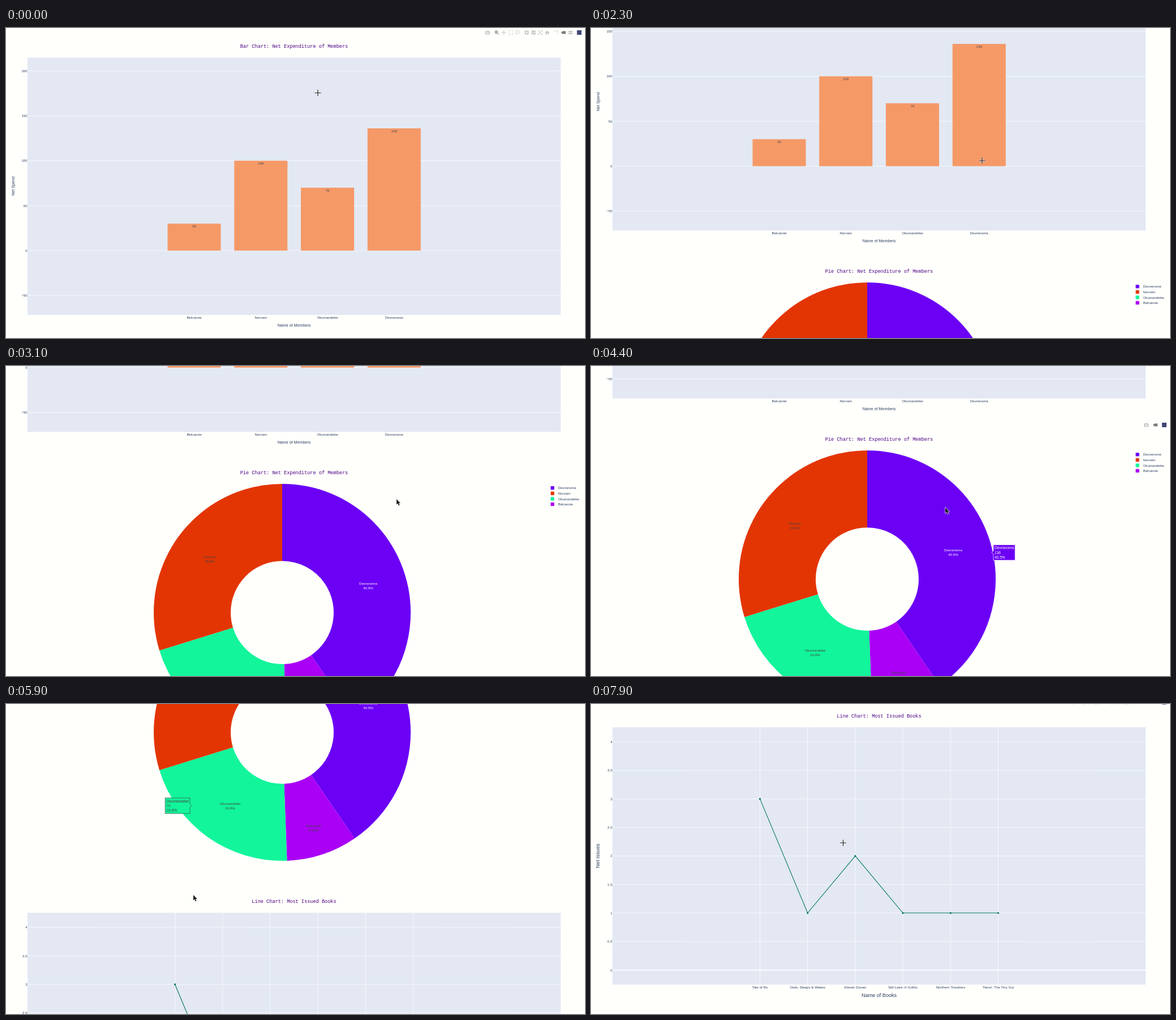
These frames come from a looping animation (1023x547 px, 8 s). An HTML page with a canvas:

```html
<!DOCTYPE html>
<html lang="en">
<head>
<meta charset="utf-8">
<title>Library charts</title>
<style>
  html, body { margin: 0; height: 100%; overflow: hidden; background: #fffffc; }
  canvas { display: block; width: 1023px; height: 547px; }
</style>
</head>
<body>
<canvas id="stage" width="1023" height="547"></canvas>
<script>
const ctx = document.getElementById('stage').getContext('2d');
const LOOP = 8000, STEP = 100;
const SANS = '"Liberation Sans", Arial, sans-serif';
const MONO = '"Liberation Mono", "Courier New", monospace';
const PAPER = '#fffffc', PLOT = '#e3e8f3', INK = '#2a3f5f', DARK = '#444', TITLE = '#4b0082';
const ORANGE = '#f59967', TEAL = '#00755e';
const LEFT = 38, RIGHT = 980, MID = 509;

const bars = [['Belcarote', 30], ['Norvam', 100], ['Okumandebe', 70], ['Devranoma', 136]]
  .map(([name, value], i) => ({ name, value, x: 332.5 + 117.75 * i, top: 392.8 - value * 1.586 }));

const pie = { x: 488, y: 825, r: 227, hole: 91 };
const TAU = 2 * Math.PI;
const slices = [
  { name: 'Devranoma', value: 136, share: '40.5%', color: '#6b00f5', text: '#fff', mid: 159 },
  { name: 'Belcarote', value: 30, share: '8.93%', color: '#aa00f5', text: DARK, mid: 178 },
  { name: 'Okumandebe', value: 70, share: '20.8%', color: '#12f59b', text: DARK, mid: 159 },
  { name: 'Norvam', value: 100, share: '29.8%', color: '#e33504', text: DARK, mid: 159 }
];
let turn = -TAU / 4;
for (const s of slices) {
  s.from = turn;
  s.to = turn += s.value / 336 * TAU;
  const a = (s.from + s.to) / 2;
  s.x = pie.x + s.mid * Math.cos(a);
  s.y = pie.y + s.mid * Math.sin(a);
}

const issueY = v => 1572 - v * 100.7;
const books = [['Tale of Ru', 3], ['Owls  Sleeps & Wakes', 1], ['Eleven Dunes', 2],
  ['Still Lake: A Gothic', 1], ['Northern Travelers', 1], ['Tiens!: The Tiny Gui', 1]]
  .map(([name, value], i) => ({ name, value, x: 298.5 + 84.2 * i, y: issueY(value) }));

// Timelines: [ms, value...]; each entry holds until the next.
const scrolls = [[0, 0], [2100, 30], [2200, 110], [2300, 149], [2500, 200], [2700, 295],
  [2800, 297], [2900, 310], [3000, 350], [3100, 390], [3200, 420], [3300, 438], [3400, 444], [3500, 446],
  [4400, 449], [4500, 540], [4600, 596], [5700, 620], [5800, 705], [5900, 775.2], [6000, 845],
  [6100, 880], [6200, 894], [6300, 920], [6400, 970], [6500, 1015], [6600, 1036.4], [6700, 1101], [6900, 1102.5]];
const pointer = [[0, 551, 114.5], [300, 545, 150], [400, 515, 230], [500, 475, 330], [600, 456.5, 384.5],
  [1000, 453.5, 384], [1100, 505, 370], [1200, 550, 335], [1300, 586.5, 302.5], [1600, 610, 290],
  [1700, 650, 262], [1800, 691, 234], [2700, 690, 235], [3300, 640, 190], [3400, 560, 140], [3500, 470, 112],
  [3600, 400, 180], [3700, 365, 240], [3900, 500, 240], [4000, 629, 242], [4200, 618, 234], [4400, 626, 250],
  [5000, 575, 265], [5100, 540, 300], [5200, 480, 325], [5400, 400, 280], [5500, 331, 337], [6000, 333, 337],
  [6400, 335, 320], [6500, 335, 312], [6900, 336, 223], [7100, 293, 178], [7200, 299, 168],
  [7700, 340, 190], [7800, 400, 225], [7900, 445.5, 245]];
const hovers = [[0], [500, 'bar', 1], [1100], [1200, 'bar', 2], [1700, 'bar', 3], [2100],
  [3700, 'pie', 3], [3900, 'pie', 0], [5100], [5200, 'pie', 2], [6000], [7200, 'line', 0], [7700]];
const at = (keys, t) => keys.findLast(k => k[0] <= t).slice(1);

function rect(x, y, w, h, color) {
  ctx.fillStyle = color;
  ctx.fillRect(x, y, w, h);
}

function text(str, x, y, { size = 6.2, color = INK, align = 'center', font = SANS } = {}) {
  ctx.font = `${size}px ${font}`;
  ctx.fillStyle = color;
  ctx.textAlign = align;
  ctx.fillText(str, x, y + size * 0.36);
}

function line(x1, y1, x2, y2, color = '#fff', width = 0.7) {
  ctx.strokeStyle = color;
  ctx.lineWidth = width;
  ctx.beginPath();
  ctx.moveTo(x1, y1);
  ctx.lineTo(x2, y2);
  ctx.stroke();
}

function verticalText(str, x, y, size) {
  ctx.save();
  ctx.translate(x, y);
  ctx.rotate(-TAU / 4);
  text(str, 0, 0, { size });
  ctx.restore();
}

const heading = (str, y) => text(str, MID, y, { size: 8.59, color: TITLE, font: MONO });

function gridRow(y, label, width) {
  line(LEFT, y, RIGHT, y, '#fff', width);
  text(label, 37.7, y, { align: 'right' });
}

function barChart() {
  heading('Bar Chart: Net Expenditure of Members', 32);
  rect(LEFT, 52.3, RIGHT - LEFT, 454, PLOT);
  for (let v = -50; v <= 200; v += 50) gridRow(392.8 - v * 1.586, String(v).replace('-', '−'));
  for (const b of bars) {
    rect(b.x - 47, b.top, 94, 392.8 - b.top, ORANGE);
    text(b.value, b.x, b.top + 5, { color: DARK });
    text(b.name, b.x, 510.8);
  }
  text('Name of Members', MID, 524.5, { size: 7.15 });
  verticalText('Net Spend', 12, 279, 7.15);
}

function pieChart() {
  heading('Pie Chart: Net Expenditure of Members', 577.7);
  for (const s of slices) {
    ctx.fillStyle = s.color;
    ctx.beginPath();
    ctx.arc(pie.x, pie.y, pie.r, s.from, s.to);
    ctx.arc(pie.x, pie.y, pie.hole, s.to, s.from, true);
    ctx.fill();
    text(s.name, s.x, s.y - 4, { color: s.text });
    text(s.share, s.x, s.y + 4, { color: s.text });
  }
  [0, 3, 2, 1].forEach((index, row) => {
    const y = 605.2 + 9.55 * row;
    rect(962.4, y - 3.1, 6.2, 6.2, slices[index].color);
    text(slices[index].name, 975.5, y, { align: 'left' });
  });
}

function lineChart() {
  heading('Line Chart: Most Issued Books', 1123.4);
  rect(LEFT, 1143.6, RIGHT - LEFT, 454, PLOT);
  for (const b of books) line(b.x, 1143.6, b.x, 1597.6);
  for (let v = 0; v <= 4; v += 0.5) gridRow(issueY(v), v, v ? 0.7 : 1.3);
  ctx.strokeStyle = TEAL;
  ctx.lineWidth = 1.1;
  ctx.beginPath();
  for (const b of books) ctx.lineTo(b.x, b.y);
  ctx.stroke();
  for (const b of books) {
    ctx.fillStyle = TEAL;
    ctx.beginPath();
    ctx.arc(b.x, b.y, 1.6, 0, TAU);
    ctx.fill();
    text(b.name, b.x, 1602);
  }
  text('Name of Books', MID, 1616, { size: 9.1 });
  verticalText('Net Issues', 12, 1370.5, 9.1);
}

// Toolbar icons: [x, filled path, stroked path, active]
const CAMERA = 'M-4-2.5h2l1-1h2l1 1h2v6h-8zM2 .4a2 2 0 1 0-4 0a2 2 0 1 0 4 0M1 .4a1 1 0 1 0-2 0a1 1 0 1 0 2 0';
const TAG = 'M-4 0l2.5-2.5h5.5v5h-5.5z';
const chartIcons = [
  [851, CAMERA, ''],
  [867, '', 'M2-.7a2.6 2.6 0 1 0-5.2 0a2.6 2.6 0 1 0 5.2 0M1.4 1.4l2.4 2.4M-2-.7h2.8M-.6-2.1v2.8', true],
  [879.7, 'M0-4l1.4 1.6h-2.8zM0 4l1.4-1.6h-2.8zM-4 0l1.6-1.4v2.8zM4 0l-1.6-1.4v2.8z', 'M-3 0h6M0-3v6'],
  [891.8, '', 'M-3.5-3.5h1.4m1.4 0h1.4m1.4 0h1.4v1.4m0 1.4v1.4m0 1.4v1.4h-1.4m-1.4 0h-1.4m-1.4 0h-1.4v-1.4m0-1.4v-1.4m0-1.4v-1.4'],
  [904, '', 'M-2.5 1.2C-5-1-3-3.3 0-3.3S4.500-1 2.800.5S-1 2-2.500 1.200C-3.500 2-2 2.500-2.800 3.800'],
  [920, 'M-3.5-3.5h7v7h-7zM-.6-2.3v1.7h-1.700v1.200h1.700v1.700h1.200v-1.700h1.700v-1.200h-1.700v-1.700z', ''],
  [932, 'M-3.5-3.500h7v7h-7zM-2.300-.6v1.200h4.600v-1.200z', ''],
  [944.2, 'M-4-4h2.500l-2.500 2.500zM4-4h-2.500l2.500 2.500zM-4 4h2.500l-2.500-2.500zM4 4h-2.500l2.500-2.500z', 'M-3-3l6 6M3-3l-6 6'],
  [956.3, 'M-4 .2l4-3.700l4 3.700h-1v3.300h-2.200v-2.200h-1.600v2.200h-2.200v-3.300z', ''],
  [972, 'M2-3.500h1.500v1.500h-1.500z', 'M-4-2.700h1.500m1 0h1.500m1 0h1M2.700-1v1.500m0 1v1.500'],
  [984.800, TAG, '', true],
  [997, 'M-4-1.500l1-1.500h7v2.600h-7zM-4 1.700l1-1.300h7v2.600h-7z', '']
];
const pieIcons = [[981, CAMERA, ''], [997, TAG, '', true]];

function toolbar(icons, y) {
  for (const [x, fill, stroke, active] of icons) {
    ctx.save();
    ctx.translate(x, y);
    ctx.fillStyle = ctx.strokeStyle = active ? '#7c7c7b' : '#c7c7c5';
    ctx.lineWidth = 1;
    ctx.fill(new Path2D(fill), 'evenodd');
    ctx.stroke(new Path2D(stroke));
    ctx.restore();
  }
  rect(1008.8, y - 4, 8, 8, '#3f4674');
}

// Callout whose tip is at (x, y); side is 1 for right, -1 for left.
function callout(x, y, side, lines, fill, ink) {
  ctx.font = `6.6px ${SANS}`;
  const w = Math.max(...lines.map(s => ctx.measureText(s).width)) + 4.2;
  const h = lines.length * 8.3 + 2.5;
  const near = x + 3 * side, far = near + w * side;
  ctx.beginPath();
  for (const [px, py] of [[x, 0], [near, -3], [near, -h / 2], [far, -h / 2], [far, h / 2], [near, h / 2], [near, 3]])
    ctx.lineTo(px, y + py);
  ctx.closePath();
  ctx.fillStyle = fill;
  ctx.strokeStyle = ink;
  ctx.lineWidth = 0.7;
  ctx.fill();
  ctx.stroke();
  lines.forEach((s, i) =>
    text(s, Math.min(near, far) + 2.1, y - h / 2 + 5.5 + 8.3 * i, { size: 6.6, color: ink, align: 'left' }));
}

function hoverLabel(kind, index) {
  if (kind === 'bar') {
    const b = bars[index];
    callout(b.x + 47, b.top, 1, [`(${b.name}, ${b.value})`, `${b.value}`], ORANGE, DARK);
  } else if (kind === 'pie') {
    const s = slices[index], side = s.x > pie.x ? 1 : -1;
    callout(s.x + side * (pie.r - s.mid), s.y, side, [s.name, `${s.value}`, s.share], s.color, s.text);
  } else if (kind === 'line') {
    const b = books[index];
    callout(b.x + 2, b.y, 1, [`(${b.name}, ${b.value})`], TEAL, '#fff');
  }
}

const ARROW = new Path2D('M0 0v9.500l2.200-2l1.700 3.700l1.700-.8l-1.700-3.500h3z');
const CROSS = new Path2D('M-5.500 0h11M0-5.500v11');

function drawPointer(x, y, crosshair) {
  ctx.save();
  ctx.translate(x, y);
  ctx.strokeStyle = 'rgba(255,255,255,.75)';
  ctx.lineWidth = crosshair ? 2.6 : 1.4;
  ctx.stroke(crosshair ? CROSS : ARROW);
  ctx.fillStyle = ctx.strokeStyle = '#1c1c1c';
  ctx.lineWidth = 1.2;
  if (crosshair) ctx.stroke(CROSS); else ctx.fill(ARROW);
  ctx.restore();
}

function draw(now) {
  const t = Math.floor(now % LOOP / STEP) * STEP;
  rect(0, 0, 1023, 547, PAPER);
  ctx.save();
  ctx.translate(0, -at(scrolls, t)[0]);
  barChart();
  pieChart();
  lineChart();
  toolbar(chartIcons, 8);
  if (t >= 3600) toolbar(pieIcons, 553);
  if (t >= 6000) toolbar(chartIcons, 1099.2);
  hoverLabel(...at(hovers, t));
  ctx.restore();
  drawPointer(...at(pointer, t), t < 2800 || t >= 6000);
}

const start = performance.now();
function tick() {
  draw(performance.now() - start);
  requestAnimationFrame(tick);
}
tick();
</script>
</body>
</html>
```
